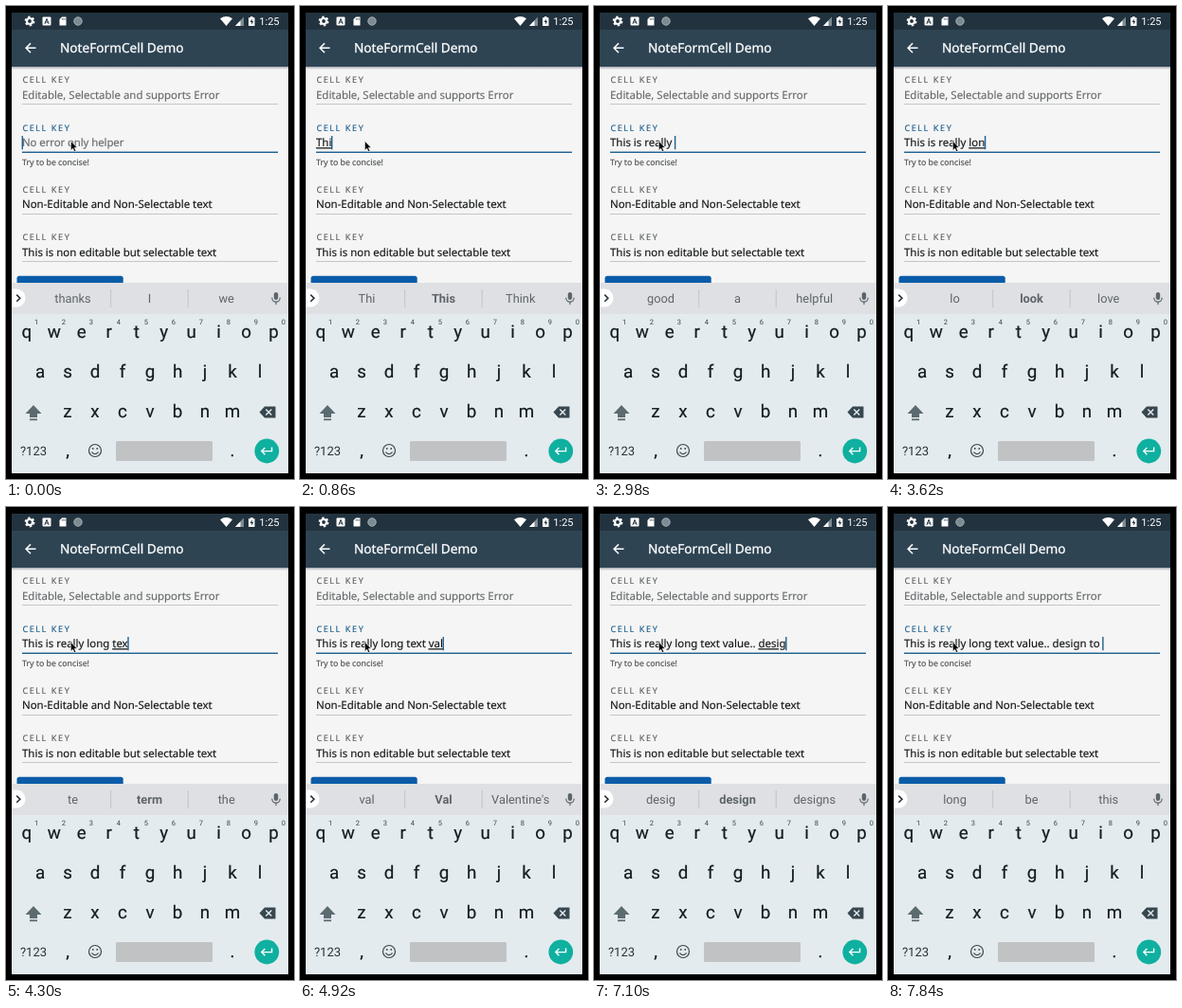
These frames come from a looping animation (304 px wide and 499 px high, 8000 ms). An HTML page:

```html
<!DOCTYPE html>
<html lang="en">
<head>
<meta charset="utf-8">
<title>Note form cell</title>
<style>
  html, body { margin: 0; width: 100%; height: 100%; overflow: hidden; background: #000; }
  svg { display: block; width: 304px; height: 499px; }
  text { white-space: pre; text-rendering: geometricPrecision; }
  .app { font: 11.45px "Noto Sans", "Open Sans", sans-serif; fill: #141618; stroke: #141618; stroke-width: .15; }
  .app .label { font-size: 9px; letter-spacing: 1.6px; fill: #5c6063; stroke: #5c6063; }
  .app .hint { fill: #686b6d; stroke: #686b6d; }
  .app .active { fill: #1d5f8e; stroke: #1d5f8e; }
  .app .help { font-size: 8.75px; fill: #4c4f51; stroke: #4c4f51; }
  .app .title { font-size: 13.65px; fill: #fff; stroke: #fff; stroke-width: .3; }
  #word { text-decoration: underline #c4c6c7 .6px; }
  .kb { font-family: Roboto, "Liberation Sans", sans-serif; fill: #263238; text-anchor: middle; }
  .keys { font-size: 18.8px; fill: #131c20; stroke: #131c20; stroke-width: .2; }
  .digits { font-size: 7.5px; fill: #37454b; }
  .picks { font-size: 12.8px; fill: #5d6469; }
  .bold { font-weight: 700; }
  .line { fill: none; stroke-linecap: round; stroke-linejoin: round; }
</style>
</head>
<body>
<svg viewBox="0 0 304 499">
  <defs>
    <linearGradient id="shade" x2="0" y2="1">
      <stop stop-color="#a9a9b2"/><stop offset="1" stop-color="#f5f5f5"/>
    </linearGradient>
  </defs>
  <rect width="304" height="499" fill="#000"/>
  <rect x="6" y="7" width="292" height="486" fill="#f5f5f5"/>
  <rect x="6" y="7" width="292" height="18" fill="#22333f"/>
  <rect x="6" y="25" width="292" height="39" fill="#2e4453"/>
  <rect x="6" y="64" width="292" height="3" fill="url(#shade)"/>

  <!-- status bar -->
  <g fill="#fff">
    <circle cx="25" cy="16" r="3" fill="none" stroke="#fff" stroke-width="2.2"/>
    <circle cx="25" cy="16" r="4.6" fill="none" stroke="#fff" stroke-width="1.6" stroke-dasharray="2.4 2.417"/>
    <rect x="38.5" y="11.5" width="9" height="9" rx="1"/>
    <path d="M41 18.6 43 13.4 45 18.6M41.8 17H44.2" class="line" stroke="#22333f"/>
    <path d="M59 11.5H63.5V20.5H56.5V14Z"/>
    <path d="M59.3 13V14.6M60.8 13V14.6M62.2 13V14.6" stroke="#22333f" stroke-width=".7"/>
    <circle cx="76" cy="16" r="4.2" fill="#7c8a92" stroke="#a5afb5"/>
    <path d="M232.5 21 226 13.3Q232.5 8.6 239 13.3Z"/>
    <path d="M242 21H251V11.5Z" fill="#7d8a92"/>
    <path d="M242 21H247.5V15.2Z"/>
    <path d="M256 12.2H258V11H260.5V12.2H262.5V21H256Z"/>
    <path d="M259.8 13.4 257.6 17H259.2V19.8L261.2 16H259.8Z" fill="#22333f"/>
    <text x="267.3" y="20" font-family="Roboto, sans-serif" font-size="11">1:25</text>
  </g>

  <path d="M31.5 44.3H21.3M26 39.4 21.1 44.3 26 49.2" fill="none" stroke="#fff" stroke-width="1.5"/>

  <!-- form -->
  <g class="app">
    <text class="title" x="57" y="49">NoteFormCell Demo</text>
    <text class="label" x="17.4" y="81">CELL KEY</text>
    <text class="hint" x="17" y="97.7">Editable, Selectable and supports Error</text>
    <text class="label active" x="17.4" y="131.5">CELL KEY</text>
    <text class="hint" id="hint" x="17" y="148.3" letter-spacing="-.1">No error only helper</text>
    <text x="17" y="148.3" id="field"><tspan id="done"></tspan><tspan id="word"></tspan></text>
    <text class="help" x="17" y="168">Try to be concise!</text>
    <text class="label" x="17.4" y="196.5">CELL KEY</text>
    <text x="17" y="213">Non-Editable and Non-Selectable text</text>
    <text class="label" x="17.4" y="247">CELL KEY</text>
    <text x="17" y="263.5">This is non editable but selectable text</text>
  </g>
  <path d="M17 103.5H287M17 219.5H287M17 269.5H287" stroke="#c4c6c7"/>
  <rect x="17" y="153.6" width="270" height="1.4" fill="#1d5f8e"/>
  <rect id="caret" y="137" width="1.4" height="14.3" fill="#1d5f8e"/>
  <rect x="11.5" y="284.7" width="112.2" height="12" rx="2.5" fill="#0a5ca8"/>

  <!-- pointer -->
  <path d="M68.4 142.5V152.2L70.6 150.2 72.1 153.6 73.8 152.9 72.3 149.5H75.2Z" fill="#000" stroke="#fff" stroke-width=".6"/>

  <!-- keyboard -->
  <rect x="6" y="292" width="292" height="201" fill="#e4ebee"/>
  <rect x="6" y="292" width="292" height="33" fill="#dfe0e4"/>
  <path d="M110.7 299V318M192.2 299V318" stroke="#c0c4c8"/>
  <path d="M6 298.5H11A9.5 9.5 0 0 1 11 317.5H6Z" fill="#fff"/>
  <path d="M11.2 304.6 14.8 308.2 11.2 311.8" fill="none" stroke="#263238" stroke-width="1.6"/>
  <g fill="#5a656b">
    <rect x="282.8" y="302" width="4.4" height="8" rx="2.2"/>
    <path class="line" d="M280.8 308A4.2 4.2 0 0 0 289.2 308M285 312.3V314.6" stroke="#5a656b" stroke-width="1.2"/>
  </g>
  <g class="kb picks" id="picks"></g>
  <g class="kb keys" id="keys"></g>
  <g class="kb digits" id="digits"></g>
  <text class="kb" x="29" y="474" font-size="13">?123</text>
  <path d="M29 421 37.5 430H33V434H25V430H20.5Z" fill="#5c6b70"/>
  <rect x="25" y="435.4" width="8" height="1.8" fill="#5c6b70"/>
  <path d="M273 422.5H284.5V434.5H273L267.5 428.5Z" fill="#37474f"/>
  <path d="M274.3 425.5 280.3 431.5M280.3 425.5 274.3 431.5" stroke="#e4ebee" stroke-width="1.4"/>
  <g class="line" stroke="#37474f" stroke-width="1.2">
    <circle cx="94" cy="469" r="6.5"/>
    <path d="M90.8 470.8Q94 474.6 97.2 470.8"/>
    <path d="M91.7 466.9H91.8M96.2 466.9H96.3" stroke-width="1.8"/>
  </g>
  <rect x="116" y="459" width="102" height="21" rx="1.5" fill="#c1c2c3"/>
  <circle cx="275.3" cy="469.5" r="12.9" fill="#0fb0a0"/>
  <path d="M280.6 465.6V469.6H270M273.4 466 269.8 469.6 273.4 473.2" fill="none" stroke="#fff" stroke-width="1.4"/>
</svg>
<script>
const LOOP = 8000, LAG = 80, LEFT = 17;
const $ = id => document.getElementById(id);

function addText(parent, x, y, value) {
  const el = document.createElementNS('http://www.w3.org/2000/svg', 'text');
  el.setAttribute('x', x);
  el.setAttribute('y', y);
  el.textContent = value;
  return parent.appendChild(el);
}

function addRow(parent, chars, x, y) {
  [...chars].forEach((c, i) => addText(parent, x + i * 28.98, y, c));
}

addRow($('keys'), 'qwertyuiop', 21.8, 350);
addRow($('keys'), 'asdfghjkl', 36.2, 391.8);
addRow($('keys'), 'zxcvbnm', 65, 434.3);
addText($('keys'), 65, 474.5, ',');
addText($('keys'), 239, 474.5, '.');
addRow($('digits'), '1234567890', 32, 336);
const picks = [70.5, 151.5, 232.7].map(x => addText($('picks'), x, 313, ''));

// Each entry: key time, typed so far (added to the stem), suggestions.
const keys = [[-LAG, '', 'thanks I we']];
function type(stem, ...list) {
  for (const [at, part, words] of list) keys.push([at, stem + part, words]);
}
type('',
  [300, 'T', 'T The They'], [520, 'Th', 'Th The They'], [760, 'Thi', 'Thi This Think'],
  [980, 'This', 'Thus This That'], [1220, 'This ', 'is will was']);
type('This ', [1620, 'i', 'i is in'], [1680, 'is', 'us is its'], [1740, 'is ', 'a the my']);
type('This is ',
  [2140, 'r', 'r really right'], [2260, 're', 're really red'], [2380, 'rea', 'rea really read'],
  [2500, 'real', 'real really realized'], [2620, 'reall', 'reall really real'],
  [2740, 'really', 'really Really real'], [2900, 'really ', 'good a helpful']);
type('This is really ',
  [3340, 'l', 'l like look'], [3480, 'lo', 'lo look love'], [3620, 'lon', 'lon long longer'],
  [3760, 'long', 'long Long longer'], [3900, 'long ', 'time and as']);
type('This is really long ',
  [4040, 't', 't the to'], [4160, 'te', 'te term the'], [4280, 'tex', 'tex text texts'],
  [4500, 'text', 'text Text texts'], [4580, 'text ', 'and me message']);
type('This is really long text ',
  [4680, 'v', 'v very via'], [4760, 'va', 'va van vary'], [4840, 'val', "val Val Valentine's"],
  [5220, 'valu', 'valu value values'], [5320, 'value', 'value Value values'],
  [5920, 'value.', 'and I the'], [6040, 'value..', 'and I the'], [6140, 'value.. ', 'thanks I we']);
type('This is really long text value.. ',
  [6420, 'd', "d do don't"], [6640, 'de', 'de dear def'],
  [6780, 'des', 'des desk design'], [6900, 'desi', 'desi design desire'],
  [7020, 'desig', 'desig design designs'], [7140, 'design', 'design Design designs'],
  [7260, 'design ', 'is and for']);
type('This is really long text value.. design ',
  [7580, 't', 't to the'], [7660, 'to', 'to too top'], [7760, 'to ', 'long be this']);

const keyAt = t => keys.findLast(k => k[0] <= t);
const lastWord = s => s.match(/\w*$/)[0];

function drawField(typed, caretOn) {
  const text = typed.replace(/ /g, '\u00a0');
  const word = lastWord(text);
  $('done').textContent = text.slice(0, text.length - word.length);
  $('word').textContent = word;
  $('hint').style.visibility = text ? 'hidden' : 'visible';
  const width = text ? $('field').getComputedTextLength() : 0;
  $('caret').setAttribute('x', LEFT + width - .4);
  $('caret').style.visibility = caretOn ? 'visible' : 'hidden';
}

function drawPicks([, typed, words]) {
  words.split(' ').forEach((w, i) => picks[i].textContent = w);
  picks[1].classList.toggle('bold', lastWord(typed) !== '');
}

const start = performance.now();
function tick() {
  const t = (performance.now() - start) % LOOP;
  drawField(keyAt(t)[1], t < 3160 || t >= 3340);
  drawPicks(keyAt(t - LAG));
  requestAnimationFrame(tick);
}
tick();
</script>
</body>
</html>
```
